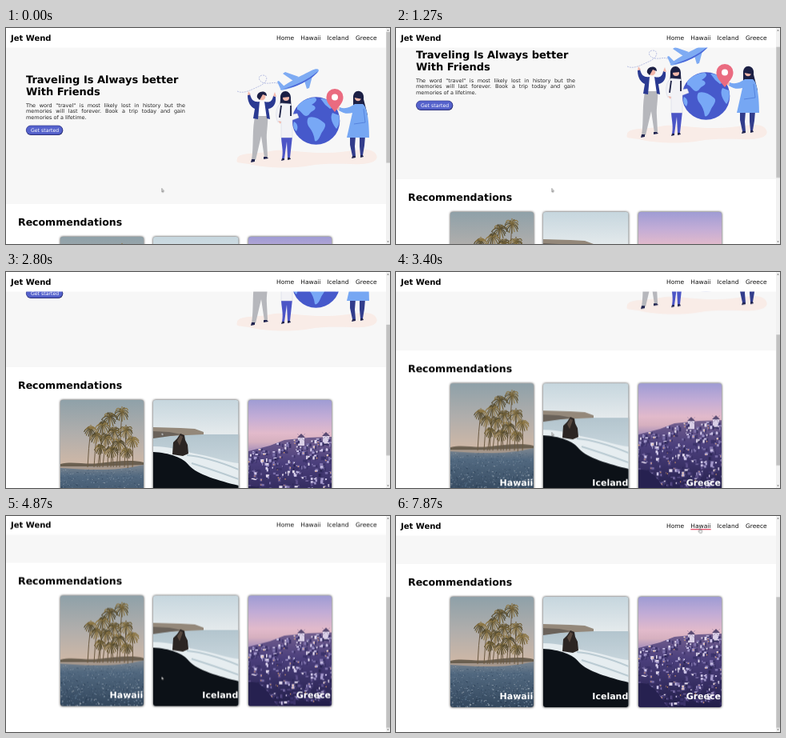
Animation, 480 px wide and 270 px high, one loop 8 s. Source, as an HTML page:

```html
<!DOCTYPE html>
<html lang="en">
<head>
<meta charset="utf-8">
<title>Travel page</title>
<style>
  html, body { margin: 0; width: 100%; height: 100%; overflow: hidden; background: #fff; }
  #stage { position: relative; width: 480px; height: 270px; overflow: hidden; background: #fff; }
  #view, #page, #head, #bar, #cursor { position: absolute; left: 0; top: 0; }
  #view { width: 475px; height: 270px; }
  svg { display: block; overflow: visible; }
  text, p { font-family: Verdana, "DejaVu Sans", sans-serif; text-rendering: geometricPrecision; }
  .bold { font-weight: 700; }
  p { position: absolute; left: 25px; top: 93.5px; width: 199px; margin: 0; font-size: 6.5px;
      line-height: 7.6px; text-align: justify; color: #222; }
  .shadow { filter: drop-shadow(0 .8px 1.4px rgba(0,0,0,.85)); }
</style>
</head>
<body>
<div id="stage">
  <div id="view">
    <div id="page">
      <svg width="475" height="430">
        <defs>
          <linearGradient id="dusk" x2="0" y2="1">
            <stop offset="0" stop-color="#8fa1a9"/><stop offset=".3" stop-color="#b0aeac"/>
            <stop offset=".6" stop-color="#d0b8a6"/>
          </linearGradient>
          <linearGradient id="stones" x2="0" y2="1">
            <stop offset="0" stop-color="#7d8791"/><stop offset=".25" stop-color="#526980"/>
            <stop offset="1" stop-color="#33475d"/>
          </linearGradient>
          <linearGradient id="mist" x2="0" y2="1">
            <stop offset="0" stop-color="#c6d6de"/><stop offset=".3" stop-color="#e4eaec"/>
          </linearGradient>
          <linearGradient id="sea" x2="0" y2="1">
            <stop offset="0" stop-color="#b3c5ce"/><stop offset=".35" stop-color="#c6d4db"/>
          </linearGradient>
          <linearGradient id="lilac" x2="0" y2="1">
            <stop offset="0" stop-color="#9f9cd4"/><stop offset=".15" stop-color="#c2acd6"/>
            <stop offset=".3" stop-color="#e2bacb"/><stop offset=".38" stop-color="#d6b0bf"/>
            <stop offset=".48" stop-color="#9d88ba"/>
          </linearGradient>
          <linearGradient id="town" x2="0" y2="1">
            <stop offset="0" stop-color="#74608f"/><stop offset=".35" stop-color="#4b3f7c"/>
            <stop offset="1" stop-color="#211d48"/>
          </linearGradient>
          <clipPath id="card1"><rect width="104" height="138" rx="3"/></clipPath>
          <clipPath id="card2"><rect width="106.5" height="138" rx="3"/></clipPath>
        </defs>

        <rect y="24" width="475" height="196" fill="#f7f7f7"/>
        <g class="bold" font-size="13">
          <text x="25" y="69">Traveling Is Always better</text>
          <text x="25" y="84.3">With Friends</text>
        </g>
        <rect x="25.3" y="122" width="46" height="12" rx="6" fill="#24285e"/>
        <rect x="25.3" y="122" width="45.4" height="11.2" rx="5.6" fill="#5562cc" stroke="#343a8c" stroke-width=".6"/>
        <text x="31" y="130" font-size="6.2" fill="#fff">Get started</text>

        <!-- travellers -->
        <path d="M289 163C292 155 312 158 330 154S372 157 402 156S452 148 460 155S463 169 445 170S404 168 380 172S325 175 308 171S287 171 289 163Z" fill="#f9ece7"/>
        <path d="M289 79C297 83 307 77 316 73C328 68 328 59 321 59S315 68 324 69S335 66 343 71" fill="none" stroke="#8f9bd6" stroke-width=".6" stroke-dasharray="2 1"/>
        <g fill="#7eabf3">
          <path d="M343 76C350 69 370 59 382 53C388 50 393 51 390 55C383 63 363 74 349 77C345 78 342 78 343 76Z"/>
          <path d="M366 61L349 55L346 57L359 66ZM373 66L376 76L379 75L383 60ZM348 73L341 66L339 67L343 76Z"/>
        </g>
        <path d="M346 76C360 73 377 65 390 54C384 64 360 76 346 76Z" fill="#4c68d8"/>

        <circle cx="387.5" cy="116" r="29.8" fill="#4659cb"/>
        <g fill="#78a8f6">
          <path d="M364 98C369 91 378 87 386 87C391 89 386 94 382 96C387 97 389 101 383 104C379 106 379 110 375 110C370 109 369 103 364 102Z"/>
          <path d="M378 112C384 110 391 113 397 118C402 121 397 127 394 132C392 138 388 143 386 141C385 134 383 129 379 124C376 120 376 115 378 112Z"/>
          <path d="M393 88C400 88 407 93 411 98L405 101L399 96ZM408 106L416 109C418 116 416 123 413 126C409 121 404 113 408 106ZM360 117C364 119 366 124 363 129C360 127 358 122 360 117Z"/>
        </g>

        <g>
          <path d="M312 108H327C328 121 325 130 326 141L327 161L323 162L319 135L312 165L307 165C310 148 307 124 312 108Z" fill="#b6b7bc"/>
          <path d="M306 168l1-4h4v3ZM322 164v-3h4l2 2Z" fill="#20244f"/>
          <path d="M315 92H325L327 110H313Z" fill="#fff"/>
          <path d="M317 92C311 93 307 91 305 83L302 84C302 93 306 99 311 101L309 113L315 114ZM323 92C330 94 333 91 334 85L337 86C338 95 334 100 328 101L330 114L326 113Z" fill="#2a3a92"/>
          <path d="M302 84l1-5 3 4ZM334 85l2-5 2 6Z" fill="#f3b8aa"/>
          <circle cx="320" cy="86" r="4.3" fill="#f3b8aa"/>
          <path d="M314 87C312 79 326 76 326 85L321 83L317 90Z" fill="#1c2045"/>
        </g>
        <g>
          <path d="M344 135H358L355 162H352L351 142L348 163H345C347 152 344 145 344 135Z" fill="#4c55c6"/>
          <path d="M344 166l1-3h3v2ZM352 165v-3h3l1 2Z" fill="#20244f"/>
          <path d="M343 88C342 76 357 76 356 89L357 105H342Z" fill="#1c2045"/>
          <path d="M344 94C337 97 336 111 340 118L344 117V137H358V115L366 112L364 107L358 108L356 95Z" fill="#f2f2f6" stroke="#cfd3e2" stroke-width=".5"/>
          <circle cx="350" cy="87" r="4" fill="#f3b8aa"/>
          <path d="M345 87C345 79 355 80 355 86Z" fill="#1c2045"/>
          <path d="M344 97L342 112M356 97L356 110" stroke="#1c2045" stroke-width="1.8"/>
          <path d="M340 116l4 1-1 3Z" fill="#f3b8aa"/>
        </g>
        <g>
          <path d="M430 135H437L436 148L437 160H433L430 146ZM442 135H449L448 147L446 159H443L442 148Z" fill="#323d8c"/>
          <path d="M432 163l1-3h4v2ZM443 162v-3h3l1 2Z" fill="#20244f"/>
          <path d="M434 88C433 75 449 76 447 89L452 109H434Z" fill="#1c2045"/>
          <path d="M436 95C430 99 424 102 417 99L416 103C423 108 429 107 433 106L426 137H454C454 119 452 99 446 95Z" fill="#76a7f3"/>
          <path d="M447 101L449 118L435 120" fill="none" stroke="#4f7ad8" stroke-width=".8"/>
          <path d="M413 98l4 1-1 4-4-2Z" fill="#f3b8aa"/>
          <circle cx="440" cy="87" r="4.2" fill="#f3b8aa"/>
          <path d="M435 87C435 78 447 78 446 89Z" fill="#1c2045"/>
        </g>
        <path d="M411 105C405 97 400 93 400.5 86A10.5 10 0 0 1 421.5 86C422 93 416 98 411 105Z" fill="#ea6b80"/>
        <circle cx="411" cy="86.5" r="4" fill="#fff"/>

        <text class="bold" x="15" y="247.3" font-size="12.5">Recommendations</text>

        <g class="shadow" transform="translate(68 261)"><g clip-path="url(#card1)" id="beach">
          <rect width="104" height="138" fill="url(#dusk)"/>
          <path d="M0 80C15 76 30 81 48 79S90 74 104 78V87H0Z" fill="#6a5f50"/>
          <path d="M0 83H38L104 81V90H0Z" fill="#a5978c"/>
          <path d="M0 85C35 87 65 90 104 81V138H0Z" fill="url(#stones)"/>
        </g></g>
        <g class="shadow" transform="translate(184 261)"><g clip-path="url(#card2)">
          <rect width="107" height="138" fill="url(#mist)"/>
          <rect y="43" width="107" height="95" fill="url(#sea)"/>
          <path d="M0 34L34 35L52 36L63 40V43L0 46Z" fill="#94887a"/>
          <path d="M0 39L20 40L36 43L0 48Z" fill="#6a625a"/>
          <path d="M0 58C22 58 36 64 57 68S94 78 107 79V109C80 104 51 94 43 82C30 73 15 68 0 68Z" fill="#e6edf0"/>
          <path d="M42 69Q68 71 107 87M48 79Q74 87 107 99" fill="none" stroke="#b9cad2" stroke-width="2"/>
          <path d="M0 65C20 66 38 72 45 82C55 93 82 101 107 107V138H0Z" fill="#0c1117"/>
          <path d="M24 68L25 53L30 48L34 42L39 44L40 50L43 56L44 67L37 70Z" fill="#2b2523"/>
          <path d="M30 51L34 44L37 46L33 57Z" fill="#57483f"/>
        </g></g>
        <g class="shadow" transform="translate(303 261)"><g clip-path="url(#card1)" id="village">
          <rect width="104" height="138" fill="url(#lilac)"/>
          <path d="M0 64L27 57L45 50L75 47L104 46V138H0Z" fill="url(#town)"/>
        </g></g>
        <g class="bold" font-size="11" fill="#fff" text-anchor="end">
          <text x="171.3" y="389">Hawaii</text>
          <text x="290.3" y="389">Iceland</text>
          <text x="406" y="389">Greece</text>
        </g>
      </svg>
      <p>The word "travel" is most likely lost in history but the memories will last forever. Book a trip today and gain memories of a lifetime.</p>
    </div>
    <svg id="head" width="475" height="25">
      <rect y="-10" width="475" height="34.5" fill="#fff"/>
      <text class="bold" x="6" y="15.9" font-size="10">Jet Wend</text>
      <g font-size="7.5" fill="#111">
        <text x="338" y="15.3">Home</text>
        <text x="368.3" y="15.3">Hawaii</text>
        <text x="401.3" y="15.3">Iceland</text>
        <text x="437" y="15.3">Greece</text>
      </g>
      <rect id="line" x="368.3" y="16.2" width="25.4" height="1.1" fill="#e0304f"/>
    </svg>
  </div>
  <svg id="bar" width="480" height="270">
    <rect x="475" width="5" height="270" fill="#f1f1f1"/>
    <path d="M476.2 3.5h2.6l-1.3-1.6ZM476.2 266.5h2.6l-1.3 1.6Z" fill="#666"/>
    <rect id="thumb" x="475.3" y="5" width="4.7" height="163.5" fill="#c1c1c1"/>
  </svg>
  <svg id="cursor" width="8" height="8" fill="#fff" stroke="#222" stroke-width=".45" stroke-linejoin="round">
    <path id="arrow" d="M0 0V4.2L1 3.4L1.6 4.8L2.2 4.5L1.6 3.2H2.9Z"/>
    <path id="hand" d="M1 0Q1.7-.5 1.9.3V2L4 2.5V4.5L3.4 5.8H1.2L-.5 3.5Q-.2 2.6 1 3.3Z"/>
  </svg>
</div>
<script>
const $ = id => document.getElementById(id);
const LOOP = 8000;

let seed = 7;
const rand = (a = 0, b = 1) => {
  seed = (seed * 16807) % 2147483647;
  return a + (b - a) * seed / 2147483647;
};
const pick = list => list[Math.floor(rand(0, list.length))];

function shape(parent, tag, attrs) {
  const el = document.createElementNS('http://www.w3.org/2000/svg', tag);
  for (const k in attrs) el.setAttribute(k, attrs[k]);
  parent.append(el);
}

const beach = $('beach');
function palm(x, y, size, foot) {
  shape(beach, 'path', {
    fill: 'none', stroke: '#6b5a42', 'stroke-width': 1,
    d: `M${foot} 84Q${foot + 1} ${y + 25} ${x} ${y}`
  });
  for (let i = 0; i < 16; i++) {
    const a = i / 16 * Math.PI * 2, r = size * rand(.7, 1.1);
    const dx = Math.cos(a) * r, dy = Math.sin(a) * r * .8;
    shape(beach, 'path', {
      fill: 'none', stroke: pick(['#544a2e', '#6f5f38', '#8d7746']), 'stroke-width': 1.2,
      d: `M${x} ${y}Q${x + dx * .7} ${y + dy - 2} ${x + dx} ${y + dy + 4}`
    });
  }
}

[[77, 15, 10, 74], [62, 21, 10, 59], [53, 31, 9, 49], [38, 36, 8, 34], [82, 38, 10, 80],
 [67, 39, 9, 63], [45, 44, 8, 42], [57, 47, 9, 53], [90, 50, 8, 90], [73, 53, 9, 70],
 [50, 59, 7, 46], [64, 62, 8, 66], [83, 64, 8, 84]].forEach(p => palm(...p));

for (let i = 0; i < 620; i++) {
  const y = rand(87, 138), r = .4 + (y - 85) / 90;
  shape(beach, 'ellipse', {
    cx: rand(0, 104), cy: y, rx: rand(.3, .4 + r), ry: rand(.2, r),
    fill: pick(['#8fa2b6', '#22344a', '#5c7690', '#a4afb8', '#344a63']), opacity: .75
  });
}

const village = $('village');
for (const [x, y] of [[66, 47], [97, 45]]) {
  shape(village, 'path', { d: `M${x - 4} ${y + 10}V${y}H${x + 4}V${y + 10}Z`, fill: '#d9cfe6' });
  shape(village, 'path', { d: `M${x - 5} ${y}L${x} ${y - 5}L${x + 5} ${y}Z`, fill: '#594a72' });
  shape(village, 'path', { d: `M${x - 5} ${y - 5}L${x + 5} ${y + 5}M${x + 5} ${y - 5}L${x - 5} ${y + 5}`, stroke: '#75658d', 'stroke-width': .4 });
}
// Houses run down the slope: lit walls with a shaded side, some with warm windows.
for (let i = 0; i < 330; i++) {
  const depth = i / 330, x = rand(-3, 104);
  const y = 65 - 17 * Math.min(1, Math.max(0, x) / 50) + 84 * depth;
  const w = rand(1.5, 6), h = rand(1.2, 4.5);
  const lit = rand() < .75 - depth * .5;
  shape(village, 'rect', {
    x, y, width: w, height: h,
    fill: pick(lit ? ['#cfc6ea', '#a297cb', '#e2d9ee', '#8174ad'] : ['#3a316a', '#5c4f8a', '#7a6ea8', '#2a2552'])
  });
  shape(village, 'rect', { x: x + w * .7, y, width: w * .5, height: h + 1, fill: '#3b3269' });
  if (i % 6 === 0) shape(village, 'rect', { x: x + 1, y: y + 1, width: 1.3, height: 1.3, fill: '#eaa76c' });
}
shape(village, 'path', { d: 'M0 108Q14 106 25 121L36 138H0Z', fill: '#262150' });

// Rows: time in ms, value, optional easing to the next row.
function play(el, rows, style) {
  const last = rows[rows.length - 1];
  const frames = [...rows, [LOOP, last[1]]].map(([t, v, easing = 'linear']) =>
    ({ offset: t / LOOP, easing, ...style(v) }));
  el.animate(frames, { duration: LOOP, iterations: Infinity });
}
const shiftY = k => v => ({ transform: `translateY(${v * k}px)` });
const show = v => ({ opacity: v });

const scroll = [[0, 0], [70, 1], [870, 22], [1270, 31], [1800, 52], [2800, 101], [3870, 138], [4340, 160]];
play($('page'), scroll, shiftY(-1));
play($('thumb'), scroll, shiftY(.602));
play($('view'), [[0, 0], [4230, 0], [4330, -2], [4460, -4.3], [4870, -1.5], [5400, 0]], shiftY(1));
play($('cursor'), [
  [0, [194.5, 200.5]], [5300, [194.5, 200.5], 'ease-in-out'],
  [6130, [368.5, 23]], [6230, [368.5, 23], 'ease-in-out'], [6600, [378.5, 15.5]]
], ([x, y]) => ({ transform: `translate(${x}px, ${y}px)` }));

const hold = 'step-end';
play($('line'), [[0, 0, hold], [6470, 1, hold]], show);
play($('hand'), [[0, 0, hold], [6470, 1, hold]], show);
play($('arrow'), [[0, 1, hold], [6470, 0, hold]], show);
</script>
</body>
</html>
```
